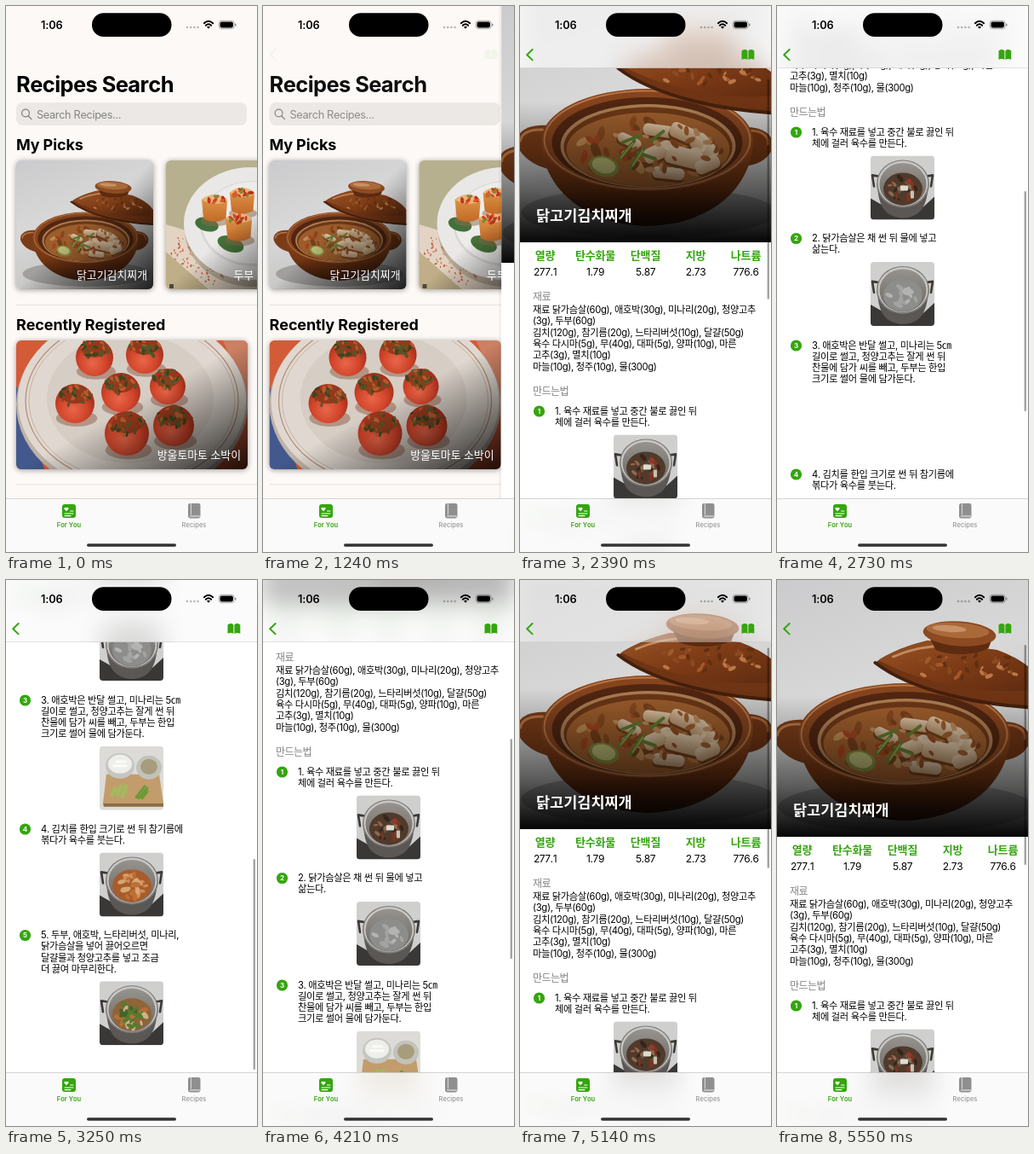
Animation, 295 px wide and 640 px high, one loop 5.74 s. Source, as an HTML page:

```html
<!DOCTYPE html>
<html lang="ko">
<head>
<meta charset="utf-8">
<title>Recipes</title>
<style>
html, body { margin: 0; width: 100%; height: 100%; overflow: hidden; background: #fff; }
svg { display: block; }
text { font-family: Inter, "Noto Sans CJK KR", "Noto Sans CJK", sans-serif; font-kerning: none; white-space: pre; }
.card { filter: drop-shadow(0 1px 3px rgba(0,0,0,.4)); }
</style>
</head>
<body>
<svg id="stage" width="295" height="640"></svg>
<script>
const W = 295, LOOP = 5740, GREEN = '#35a50f', END = 597;
const $ = id => document.getElementById(id);

// --- drawing helpers ---
const rect = (x, y, w, h, fill, r = 0, more = '') =>
  `<rect x="${x}" y="${y}" width="${w}" height="${h}" rx="${r}" fill="${fill}" ${more}/>`;
const oval = (x, y, rx, ry, fill, more = '') =>
  `<ellipse cx="${x}" cy="${y}" rx="${rx}" ry="${ry}" fill="${fill}" ${more}/>`;
const path = (d, fill, more = '') => `<path d="${d}" fill="${fill}" ${more}/>`;
const line = (d, color, w) => path(d, 'none', `stroke="${color}" stroke-width="${w}" stroke-linecap="round" stroke-linejoin="round"`);
const group = (body, attrs) => `<g ${attrs}>${body}</g>`;
const move = (x, y, body) => group(body, `transform="translate(${x} ${y})"`);
// y is the middle of the line
const text = (x, y, s, size, { fill = '#000', weight = 400, gap = -.35, anchor = 'start' } = {}) =>
  `<text x="${x}" y="${y + size * .36}" font-size="${size}" font-weight="${weight}" fill="${fill}" letter-spacing="${gap}" text-anchor="${anchor}">${s}</text>`;
const clip = (id, x, y, w, h, r) => `<clipPath id="${id}">${rect(x, y, w, h, '#000', r)}</clipPath>`;
const fade = (id, dir, ...stops) => `<linearGradient id="${id}" x1="0" y1="0" ${dir}>` +
  stops.map(([o, c, a = 1]) => `<stop offset="${o}" stop-color="${c}" stop-opacity="${a}"/>`).join('') + '</linearGradient>';
const DOWN = 'x2="0" y2="1"';

function scatter(n, x, y, rx, ry, colors, size, seed) {
  const rnd = () => (seed = (seed * 16807) % 2147483647) / 2147483647;
  let out = '';
  for (let i = 0; i < n; i++) {
    const a = rnd() * 6.283, d = Math.sqrt(rnd()), s = size * (.6 + rnd() * .7);
    const px = x + Math.cos(a) * d * rx, py = y + Math.sin(a) * d * ry;
    out += oval(px.toFixed(1), py.toFixed(1), s.toFixed(1), (s * .5).toFixed(1), colors[i % colors.length],
      `transform="rotate(${Math.round(rnd() * 180)} ${px.toFixed(1)} ${py.toFixed(1)})"`);
  }
  return out;
}

// --- dishes ---
function stewPot() {
  const chunk = ([x, y, w, h, turn]) => group(
    rect(-w / 2, -h / 2 + 3, w, h, '#6f3d1b', 6) + rect(-w / 2, -h / 2, w, h, 'url(#meat)', 6),
    `transform="translate(${x} ${y}) rotate(${turn})"`);
  return rect(0, 0, 322, 301, 'url(#wall)') +
    oval(165, 266, 150, 30, '#3c3835', 'opacity=".3"') +
    path('M46 164C22 162 8 172 10 186C14 200 30 212 52 216Z', '#7a3c18') + line('M40 169C24 168 15 174 14 182', '#b97847', 3) +
    path('M280 166C302 166 314 178 310 192C304 204 294 210 276 212Z', '#6f3514') + line('M286 170C300 171 306 178 305 186', '#a7683a', 3) +
    path('M39 178C36 228 80 280 163 282C246 280 290 228 287 178Z', 'url(#clay)') +
    oval(163, 181, 124, 60, '#85441e') +
    oval(163, 181, 121, 57.5, 'none', 'stroke="#b87543" stroke-width="2"') +
    oval(163, 184, 112, 53, '#512611') +
    oval(164, 188, 103, 49, '#ad7d52') +
    oval(164, 189, 99, 46.5, '#6b3717') +
    oval(164, 192, 96, 43, '#9c5d2c') +
    scatter(46, 164, 193, 86, 35, ['#b4743a', '#85481d', '#bd8a54', '#a2441e', '#74401b'], 8, 17) +
    oval(112, 212, 18, 12, '#7f8a3c', 'transform="rotate(15 112 212)"') +
    oval(112, 211, 14, 9, '#b9b875', 'transform="rotate(15 112 211)"') +
    [[176, 170, 36, 14, 8], [208, 174, 38, 18, 24], [230, 190, 34, 22, 48], [176, 195, 36, 18, -25],
      [206, 201, 44, 22, 14], [234, 210, 30, 16, -24], [142, 182, 30, 12, 26], [188, 220, 38, 14, 6]].map(chunk).join('') +
    scatter(26, 190, 192, 56, 28, ['#9c5d2c', '#d8bf9f', '#8f4a22', '#b98a5e'], 5, 91) +
    line('M130 204L148 182M143 214L160 190M152 196L172 203M134 184L154 176M168 182L182 171', '#5d7a30', 4) +
    line('M132 202L146 185M146 211L158 193', '#93a84e', 1.5) +
    path('M129 97C145 84 170 76 190 71L272 82C300 92 314 104 322 116V150C256 148 176 132 129 97Z', '#6f3414') +
    path('M133 94C148 84 172 76 192 71L272 82C298 92 314 108 318 128C262 136 184 122 133 94Z', 'url(#lid)') +
    line('M129 97C172 130 252 147 322 150', '#44200c', 4) +
    line('M150 90C170 81 186 79 204 77', '#c28b5e', 3) +
    scatter(34, 238, 103, 66, 18, ['#a2592a', '#62300f', '#b9794a', '#8a4a20'], 4, 33) +
    path('M192 66L200 82C220 90 248 88 262 80L266 70Z', '#5d2b10') +
    oval(228, 63, 43, 14.5, '#8b4a21', 'transform="rotate(4 228 63)"') +
    oval(226, 59, 37, 9, '#aa6939', 'transform="rotate(4 226 59)"') +
    oval(216, 57, 20, 4, '#c79065', 'transform="rotate(4 216 57)"');
}

function tofuPlate() {
  const cube = (x, y, s) => move(x, y,
    oval(s * .55, s, s * .55, s * .2, '#8c6a4c', 'opacity=".5"') +
    path(`M1 6Q${s * .2} 1 ${s * .5} 0Q${s} 2 ${s} 8L${s * .95} ${s * .9}Q${s * .5} ${s * 1.15} ${s * .1} ${s * .9}Z`, 'url(#tofu)') +
    path(`M1 6Q${s * .2} 1 ${s * .5} 0Q${s} 2 ${s} 8Q${s * .5} 15 1 6Z`, '#e9b677') +
    scatter(13, s * .5, 6, s * .38, 5, ['#b9301b', '#dd5a2b', '#c9402a', '#7d8a36'], 3, 7 + s));
  return rect(188, 181, 161, 151, '#b7b08f') +
    path('M188 256L228 268L300 308L349 332H188Z', '#e3d3c2') +
    scatter(150, 222, 300, 42, 32, ['#b9513b', '#cf7c65'], 1.5, 45) +
    path('M188 288L238 332H188Z', '#bfae87') +
    oval(290, 262, 80, 67, '#8d8570', 'opacity=".5"') +
    oval(288, 255, 79, 66, '#e9e8e6') + oval(290, 255, 62, 50, '#d8d7d5') + oval(290, 254, 60, 48, '#edecea') +
    oval(236, 256, 14, 8, '#42703b', 'transform="rotate(15 236 256)"') +
    oval(264, 279, 16, 9, '#447339', 'transform="rotate(20 264 279)"') +
    cube(262, 213, 30) + cube(229, 221, 31) + cube(304, 222, 30) + cube(257, 243, 32) + cube(300, 254, 30) +
    rect(192, 326, 5, 5, '#4a4a42');
}

function tomatoPlate() {
  const tomato = ([x, y, r], i) => oval(x + 2, y + r * .75, r * 1.05, r * .42, '#8f5c48', 'opacity=".5"') +
    oval(x, y, r, r, 'url(#tomato)') +
    oval(x, y - r * .42, r * .68, r * .42, '#94381b') +
    scatter(34, x, y - r * .42, r * .8, r * .52, ['#565527', '#84431e', '#b85a2d', '#3d441f'], 3.4, 50 + i * 13);
  return rect(12, 392, 272, 151, '#d45b38') + path('M12 445L45 543H12Z', '#43598e') +
    path('M255 392H284V460Z', '#cc8064') +
    oval(148, 467, 136, 108, '#bfb2a6') + oval(148, 463, 134, 105, '#e0d8d0') +
    oval(148, 463, 125, 97, 'none', 'stroke="#b08b75" stroke-width="1.2"') +
    oval(148, 463, 121, 93, 'none', 'stroke="#c4a796" stroke-width=".8"') +
    oval(146, 460, 98, 76, '#d6cdc4') +
    [[104, 412, 22], [163, 409, 22], [81, 466, 23], [190, 446, 21], [135, 453, 23], [197, 492, 24], [142, 501, 26]].map(tomato).join('');
}

function stepPhoto(kind) {
  const soup = ['#503a2b', '#8d8d8c', '', '#a95c2b', '#8f6436'][kind];
  const bits = [['#6b5140', '#8d6b50', '#33261c', '#7a3422'], ['#b3b3b1', '#a3a3a0'], [], ['#cf8f57', '#bd6f35', '#d8a672'], ['#cdb48e', '#567a32', '#b66f38', '#42642a']][kind];
  if (kind === 2) return rect(0, 0, 75, 75, '#dcdbd8') +
    path('M8 33H70L75 67H4Z', '#c39c6b') + path('M4 67H75V71H5Z', '#8e6c42') +
    oval(24, 23, 17, 15, '#c5c6c2') + oval(24, 21, 14, 11, '#eeeeea') +
    oval(58, 25, 15, 14, '#c1c2ba') + oval(58, 24, 10, 9, '#a79c7c') +
    line('M17 23H31M20 18H30', '#fafaf7', 3) +
    line('M18 50L15 57M25 47L21 57M31 47L27 59', '#a5b860', 5) +
    line('M43 60L53 47M46 61L56 49M50 61L56 53', '#6d9a35', 3);
  return rect(0, 0, 75, 75, '#cfcfce') + path('M0 50L14 58L62 60L75 48V75H0Z', '#3a3836') +
    line('M8 24L2 23L4 36M67 24L73 23L71 36', '#3c3936', 2.6) +
    path('M8 34C9 58 16 72 38 73C60 72 66 58 68 34Z', '#5a5755') +
    oval(38, 33, 31, 28, '#7d7a77') + oval(38, 32.5, 29.5, 26.5, '#c9c7c4') + oval(38, 33.5, 27.5, 25, 'url(#steel)') +
    oval(38, 39, 23, 19, soup) + scatter(kind === 1 ? 12 : 24, 38, 39, 17, 14, bits, kind ? 5 : 4, 11 + kind * 29) +
    (kind === 0 ? oval(45, 30, 3, 3, '#96382a') + rect(35, 35, 9, 6, '#dddbd0', 1) + rect(47, 41, 4, 9, '#c9c2b3', 1) : '') +
    (kind === 4 ? line('M30 45L44 30M36 48L50 36M34 34L48 42', '#557d2c', 2.2) : '');
}

// --- pages ---
const defs = '<defs>' + clip('c1', 12, 181, 161, 151, 6) + clip('c2', 188, 181, 161, 151, 6) + clip('c3', 12, 392, 272, 151, 6) +
  clip('thumb', 0, 0, 75, 75, 4) + clip('hero', 0, 0, W, 301, 0) + clip('navBox', 0, 0, W, 73, 0) + clip('tabBox', 0, 577, W, 63, 0) +
  '<filter id="frost" filterUnits="userSpaceOnUse" x="-40" y="-40" width="375" height="720" color-interpolation-filters="sRGB"><feGaussianBlur stdDeviation="14"/></filter>' +
  fade('wall', 'x2=".4" y2="1"', [0, '#cbcbcd'], [.5, '#d8d8d8'], [1, '#c4c3c2']) +
  fade('clay', DOWN, [0, '#8a451c'], [.5, '#733613'], [1, '#36180a']) +
  fade('lid', 'x2="1" y2="1"', [0, '#9a5426'], [.5, '#7d3b16'], [1, '#5f2b10']) +
  fade('meat', DOWN, [0, '#dcc6aa'], [1, '#b8936b']) +
  fade('tofu', DOWN, [0, '#e29a4e'], [1, '#c26a26']) +
  fade('steel', DOWN, [0, '#96938f'], [1, '#6b6763']) +
  fade('shade', DOWN, [0, '#000', 0], [.45, '#000', 0], [.8, '#000', .55], [1, '#000', .97]) +
  fade('dusk', 'x2="1" y2="1"', [0, '#000', 0], [.5, '#000', 0], [1, '#000', .85]) +
  '<radialGradient id="tomato" cx=".45" cy=".65" r=".6"><stop offset="0" stop-color="#e8674a"/><stop offset=".6" stop-color="#d2452b"/><stop offset="1" stop-color="#a52f1c"/></radialGradient>' +
  `<g id="pot">${stewPot()}</g></defs>`;

function card(id, x, y, w, photo, end, name) {
  return group(group(photo + rect(x, y, w, 151, 'url(#dusk)'), `clip-path="url(#${id})"`), 'class="card"') +
    text(end, y + 134, name, 12.9, { fill: '#fff', weight: 500, gap: 0, anchor: 'end' });
}

function homePage() {
  const bold = { weight: 700, gap: -.1 };
  const search = text(12, 91.7, 'Recipes Search', 25.5, { weight: 700, gap: -.6 }) +
    rect(12, 113, 271, 27, '#ebe8e5', 7.5) +
    oval(23, 125.5, 4.4, 4.4, 'none', 'stroke="#7f7e7c" stroke-width="1.2"') + line('M26.3 129L30 132.6', '#7f7e7c', 1.3) +
    text(36, 127.2, 'Search Recipes...', 12.75, { fill: '#868583' });
  return rect(0, 0, 400, 640, '#fdf9f6') + group(search, 'id="search"') +
    text(12, 162.7, 'My Picks', 18, bold) +
    card('c1', 12, 181, 161, group('<use href="#pot"/>', 'transform="translate(12 181) scale(.5)"'), 166, '닭고기김치찌개') +
    card('c2', 188, 181, 161, tofuPlate(), 342, '두부 양념구이') +
    rect(12, 350, 283, .7, '#dcdad6') +
    text(12, 373.6, 'Recently Registered', 18, bold) +
    card('c3', 12, 392, 272, tomatoPlate(), 276, '방울토마토 소박이') +
    rect(12, 560.5, 283, .7, '#dcdad6');
}

const facts = [['열량', '277.1'], ['탄수화물', '1.79'], ['단백질', '5.87'], ['지방', '2.73'], ['나트륨', '776.6']];
const parts = ['재료 닭가슴살(60g), 애호박(30g), 미나리(20g), 청양고추', '(3g), 두부(60g)',
  '김치(120g), 참기름(20g), 느타리버섯(10g), 달걀(50g)', '육수 다시마(5g), 무(40g), 대파(5g), 양파(10g), 마른',
  '고추(3g), 멸치(10g)', '마늘(10g), 청주(10g), 물(300g)'];
const steps = [
  [499, '1. 육수 재료를 넣고 중간 불로 끓인 뒤', '체에 걸러 육수를 만든다.'],
  [623.5, '2. 닭가슴살은 채 썬 뒤 물에 넣고', '삶는다.'],
  [749, '3. 애호박은 반달 썰고, 미나리는 5㎝', '길이로 썰고, 청양고추는 잘게 썬 뒤', '찬물에 담가 씨를 빼고, 두부는 한입', '크기로 썰어 물에 담가둔다.'],
  [900, '4. 김치를 한입 크기로 썬 뒤 참기름에', '볶다가 육수를 붓는다.'],
  [1024.5, '5. 두부, 애호박, 느타리버섯, 미나리,', '닭가슴살을 넣어 끓어오르면', '달걀물과 청양고추를 넣고 조금', '더 끓여 마무리한다.']];

function recipePage() {
  const label = { fill: '#858585', gap: -.5 };
  const body = (x, y, rows) => rows.map((s, i) => text(x, y + i * 13.3, s, 11.26)).join('');
  return group('<use href="#pot" x="-13.5"/>' + rect(0, 0, W, 301, 'url(#shade)'), 'clip-path="url(#hero)"') +
    text(19, 270, '닭고기김치찌개', 17.5, { fill: '#fff', weight: 700, gap: 0 }) +
    facts.map(([k, v], i) =>
      text(29.5 + 59 * i, 316, k, 13, { fill: GREEN, weight: 600, gap: -.2, anchor: 'middle' }) +
      text(29.5 + 59 * i, 336, v, 12, { gap: -.4, anchor: 'middle' })).join('') +
    text(15, 365, '재료', 12, label) + body(15, 380, parts) + text(15, 476, '만드는법', 12, label) +
    steps.map(([y, ...rows], i) => oval(22.5, y, 6.6, 6.6, GREEN) +
      text(22.5, y, i + 1, 8, { fill: '#fff', weight: 700, gap: 0, anchor: 'middle' }) + body(41, y - .5, rows) +
      group(stepPhoto(i), `id="photo${i}" clip-path="url(#thumb)" transform="translate(110 ${y + (rows.length - 1) * 13.2 + 14.2})"`)).join('');
}

// --- bars ---
const frosted = (box, y, h, veil) => group(
  group(rect(-40, -40, 375, 720, '#fff') + '<use href="#recipe"/>', 'filter="url(#frost)"') +
  rect(0, y, W, h, '#f9f9f9', 0, `opacity="${veil}"`), `clip-path="url(#${box})"`);

const statusBar = text(41, 22, '1:06', 12.75, { weight: 600, gap: -.1 }) + rect(101, 8.3, 93.5, 27.7, '#000', 13.8) +
  [0, 1, 2, 3].map(i => oval(213 + i * 4.2, 25, 1.3, 1.3, '#000', 'opacity=".28"')).join('') +
  line('M232.8 20.2Q238 15.4 243.2 20.2M234.8 22.8Q238 19.8 241.2 22.8', '#000', 1.9) + path('M236 24.6Q238 23 240 24.6L238 26.8Z', '#000') +
  rect(250.2, 17.3, 18, 9.4, 'none', 3, 'stroke="#000" stroke-opacity=".4" stroke-width=".8"') +
  rect(251.5, 18.6, 15.4, 6.8, '#000', 1.8) + rect(269.2, 20.4, 1.2, 3.2, '#777', .6);

const tools = line('M14.6 51L8.2 57.2L14.6 63.4', GREEN, 2) +
  path('M260.5 52.5Q264.5 49.8 267.4 52.4V63Q264.5 61 260.5 62.8ZM275.3 52.5Q271.3 49.8 268.4 52.4V63Q271.3 61 275.3 62.8Z', GREEN);

const tabs = rect(0, 577, W, .6, '#000', 0, 'opacity=".25"') +
  rect(66, 584, 16, 16, GREEN, 3) + path('M71 592.3L68.6 589.7C67.8 588 70.2 586.8 71 588.5C71.8 586.8 74.2 588 73.4 589.7Z', '#fff') +
  line('M75.5 592H79M69 595H79M69 597.6H76', '#fff', 1.1) +
  text(74, 608.5, 'For You', 7.5, { fill: GREEN, weight: 600, gap: 0, anchor: 'middle' }) +
  rect(214, 583, 14.5, 17.5, '#8f8f8f', 2.4) + line('M217.4 583.5V596', '#f4f4f4', .8) + line('M216.5 598H227.5', '#f4f4f4', 1.2) +
  text(221, 608.5, 'Recipes', 7.5, { fill: '#979797', weight: 500, gap: .05, anchor: 'middle' }) +
  rect(95, 630.2, 105, 3.6, '#333', 1.8);

$('stage').innerHTML = defs + group(homePage(), 'id="home"') +
  group(rect(-3, 0, 3, 640, '#000', 0, 'opacity=".04"') + rect(0, -40, W, 720, '#fff') + group(recipePage(), 'id="scroll"'), 'id="recipe"') +
  group(frosted('navBox', 0, 73, .7) + rect(0, 72.5, W, .5, '#000', 0, 'opacity=".2"'), 'id="nav"') +
  frosted('tabBox', 577, 63, .84) + statusBar + group(tools, 'id="tools"') +
  rect(290.6, 0, 2.4, 258, '#000', 1.2, 'id="thumbBar"') + tabs;

// --- motion ---
const pushTimes = [1240, 1350, 1470, 1580, 1700, 1810, 1950];
const scrolls = [[0, 0],
  [2390, 24], [2500, 125], [2610, 250], [2730, 351], [2840, 405], [2930, 438],
  [3050, 480], [3150, 563], [3250, 608], [3350, 602], [3450, END],
  [3750, 585], [3860, 525], [3970, 435], [4080, 345], [4210, 274], [4310, 236],
  [4410, 206], [4510, 160], [4610, 110], [4710, 71], [4810, 45], [4910, 28],
  [5020, 16], [5120, 9], [5230, 5], [5340, 3], [5440, 1], [5550, 0]];
const PHOTO_LOADED = 2840, FIRST_SCROLL = 2390;
const lastBefore = (list, t, time = v => v) => list.filter(v => time(v) <= t).pop();

// critically damped slide of the pushed page
function slide(t) {
  const step = lastBefore(pushTimes, t);
  if (!step) return W;
  if (step === 1950) return 0;
  const k = (step - 1210) * .0119;
  return W * (1 + k) * Math.exp(-k);
}

let drawn = '';
function draw(t) {
  const x = slide(t), shown = 1 - x / W, y = lastBefore(scrolls, t, v => v[0])[1];
  const loaded = +(t >= PHOTO_LOADED), scrolled = t >= FIRST_SCROLL, pose = [x, y, loaded, scrolled].join();
  if (pose === drawn) return;
  drawn = pose;
  const over = Math.max(0, y - END), set = (id, k, v) => $(id).setAttribute(k, v);
  set('home', 'transform', `translate(${-.3 * W * shown} 0)`);
  set('search', 'opacity', Math.max(0, 1 - shown * 1.2));
  set('recipe', 'transform', `translate(${x + (x === W ? 10 : 0)} 0)`);
  set('scroll', 'transform', `translate(0 ${-y})`);
  set('nav', 'opacity', Math.min(1, y / 16));
  set('tools', 'opacity', shown);
  set('photo2', 'opacity', loaded);
  set('photo3', 'opacity', loaded);
  set('thumbBar', 'y', 76 + .402 * Math.min(y, END) + over);
  set('thumbBar', 'height', 258 - over);
  set('thumbBar', 'opacity', scrolled ? .36 : 0);
}

const start = performance.now();
function tick() {
  draw((performance.now() - start) % LOOP);
  requestAnimationFrame(tick);
}
tick();
</script>
</body>
</html>
```
